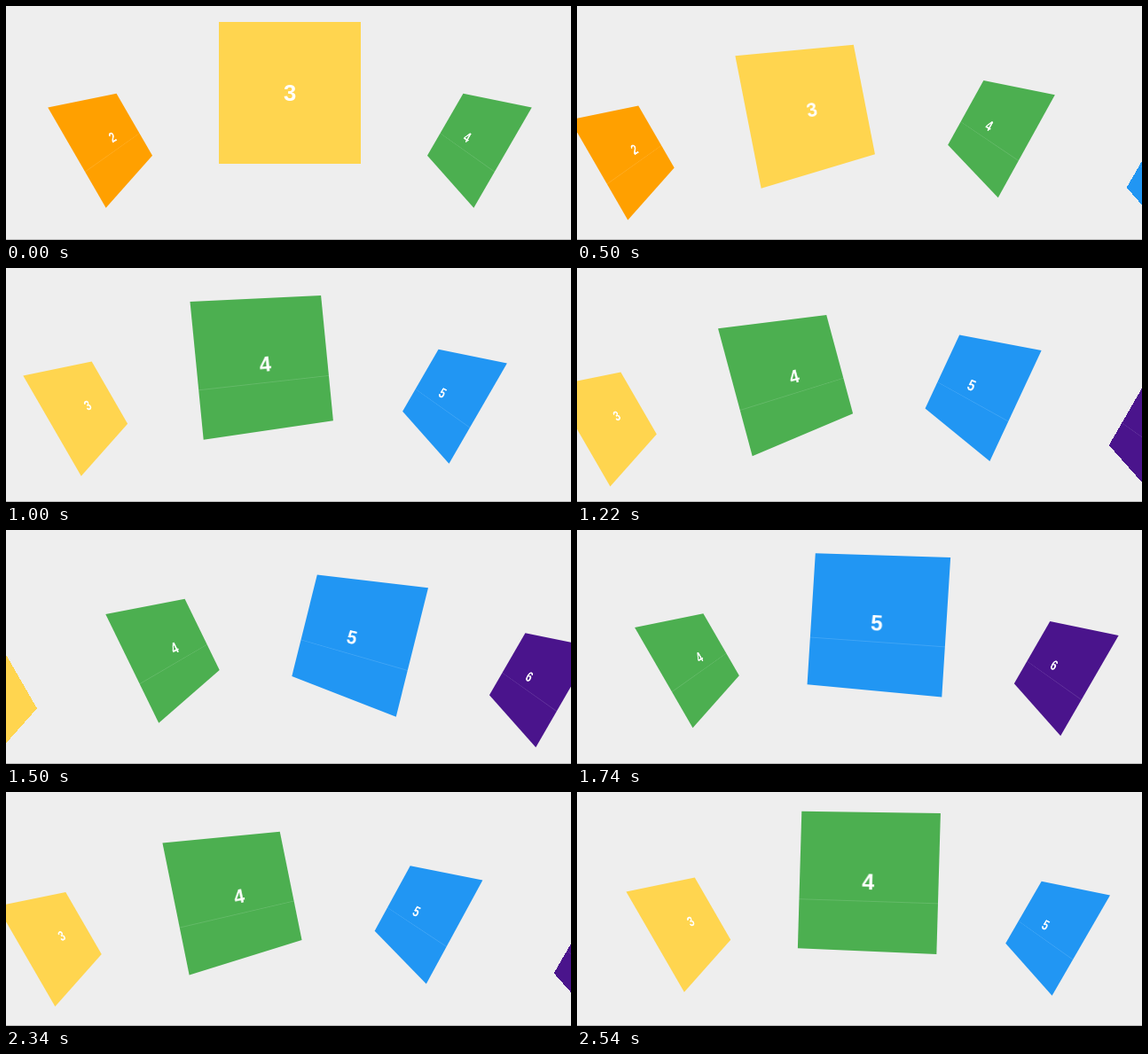
Recreate the animation shown at these times as an HTML page. Size 637 by 264 pixels, loop 2.56 s.

```html
<!DOCTYPE html>
<html lang="en">
<head>
<meta charset="utf-8">
<title>Carousel</title>
<style>
  html, body { margin: 0; width: 100%; height: 100%; overflow: hidden; background: #eee; }
  .stage { position: relative; width: 637px; height: 264px; overflow: hidden; }
  .stage::after {
    content: ""; position: absolute; left: 0; bottom: 0; width: 100%; height: 1px;
    background: #bbb;
  }
  .card {
    position: absolute; left: 239.5px; top: 17.5px; width: 160px; height: 160px;
    font: bold 25.6px/160px "Liberation Sans", Arial, sans-serif;
    color: #fff; text-align: center;
  }
  .seam::after {
    content: ""; position: absolute; left: 0; top: 64%; width: 100%; height: 1px;
    background: rgba(255, 255, 255, .13);
  }
</style>
</head>
<body>
<div class="stage">
  <div class="card seam" style="background:#ffa000">2</div>
  <div class="card" style="background:#ffd54f">3</div>
  <div class="card seam" style="background:#4caf50">4</div>
  <div class="card seam" style="background:#2196f3">5</div>
  <div class="card seam" style="background:#4a148c">6</div>
</div>
<script>
  const LOOP = 2560, GAP = 200, REACH = 150;
  const cards = [...document.querySelectorAll('.card')];

  // Drag path: time in ms, centred card, speed in cards per second
  const path = [
    [0, 3, 0], [150, 3, 0], [500, 3.275, 1.6], [800, 3.852, 1.7],
    [1220, 4.375, 1], [1620, 4.775, 1.1], [1740, 4.91, .8],
    [1820, 4.941, 0], [2140, 4.597, -1.35], [LOOP, 3.93, -1.5]
  ];

  // Cubic Hermite interpolation along the path
  function position(t) {
    const i = path.findIndex(p => p[0] > t);
    const [t0, a, va] = path[i - 1], [t1, b, vb] = path[i];
    const d = (t1 - t0) / 1000, x = (t - t0) / (t1 - t0), y = 1 - x;
    return a * y * y * (1 + 2 * x) + b * x * x * (1 + 2 * y)
      + d * x * y * (va * y - vb * x);
  }

  function place(card, x) {
    const u = Math.max(-1, Math.min(1, x / REACH));
    card.style.transform = `translateX(${x}px) scale(${1 - .375 * Math.abs(u)})
      translateY(${.4 * Math.abs(x)}px) rotate(${30 * u}deg)
      perspective(240px) rotateY(${-45 * u}deg)`;
  }

  function draw() {
    const centre = position(performance.now() % LOOP);
    cards.forEach((card, i) => place(card, (i + 2 - centre) * GAP));
    requestAnimationFrame(draw);
  }
  draw();
</script>
</body>
</html>
```
